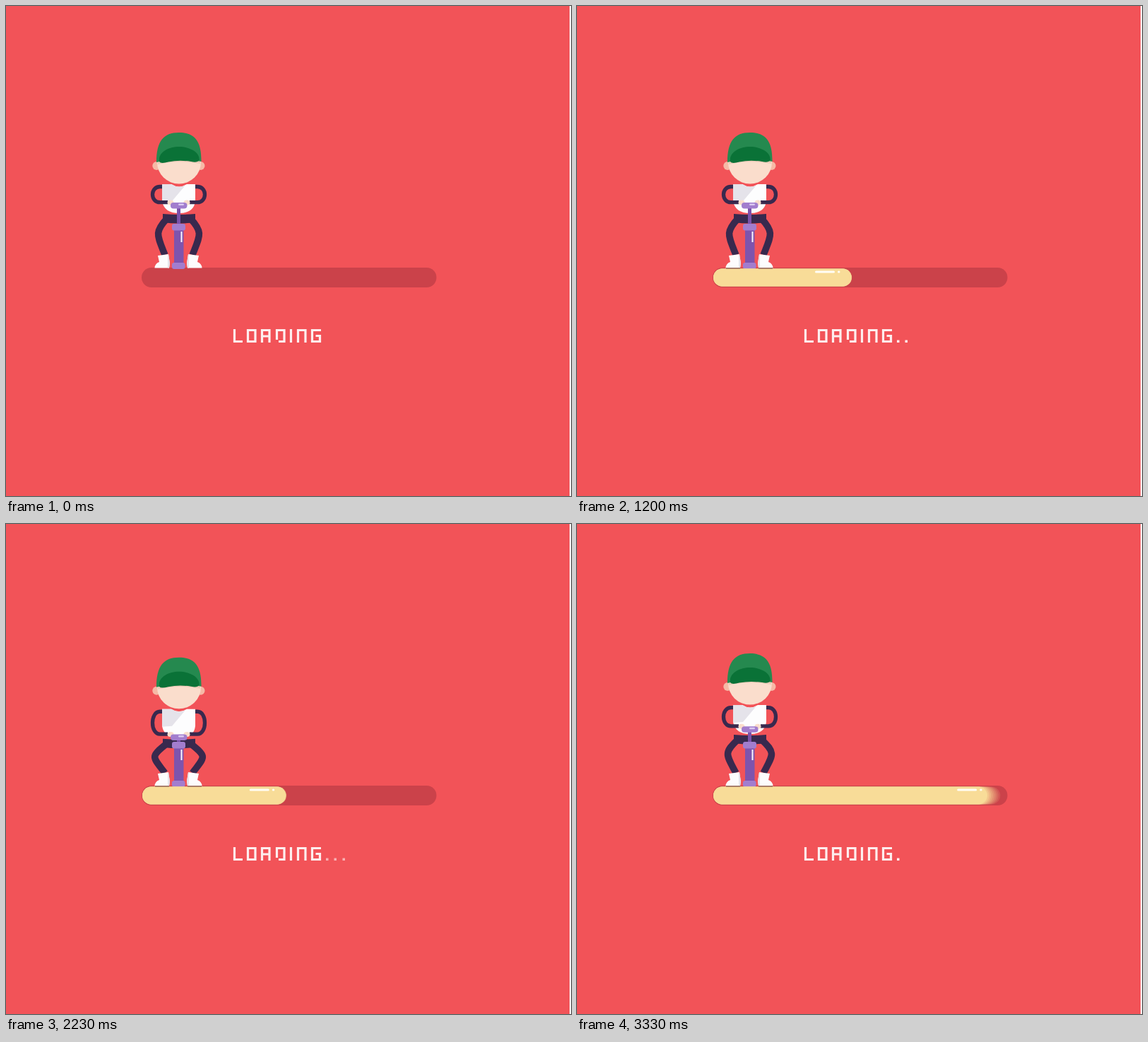
Animation of 800 by 693 pixels, one loop 3360 ms. Source, as an HTML page:

```html
<!DOCTYPE html>
<html lang="en">
<head>
<meta charset="utf-8">
<title>Loading</title>
<style>
  html, body { margin: 0; width: 100%; height: 100%; overflow: hidden; background: #f25358; }
  svg { display: block; width: 800px; height: 693px; }
</style>
</head>
<body>
<svg viewBox="0 0 800 693" role="img" aria-label="LOADING...">
  <defs>
    <g id="shoe">
      <path d="M215 353L230 351L232 364L231 370.5H210.5Q211 364 217 362Z" fill="#fdfcfd"/>
      <path d="M229 351.3L230 351L232 364L231 370.5H229Z" fill="#e6e3ea"/>
    </g>
  </defs>
  <rect width="800" height="693" fill="#fff"/>
  <rect width="798" height="693" fill="#f25358"/>
  <rect x="192" y="370" width="417.500" height="28" rx="14" fill="#cb424a"/>

  <g fill="none" stroke="#38294e" stroke-width="9.500">
    <path id="legL"/>
    <path id="legR"/>
  </g>
  <use href="#shoe"/>
  <use href="#shoe" transform="translate(488 0) scale(-1 1)"/>

  <g id="body">
    <path d="M222 294Q245 296 268 294V306Q245 309 222 306Z" fill="#38294e"/>
    <path d="M221 252H234Q245 259 256 252H268V276Q266 293 245 293Q224 293 221 276Z" fill="#fdfdfe"/>
    <path d="M221 252H234Q244 258.500 254 253.500L235 276L221 277Z" fill="#e5e3ea"/>
    <circle cx="213.300" cy="226" r="6" fill="#f6b9a6"/>
    <circle cx="275.500" cy="226" r="6" fill="#f6b9a6"/>
    <path d="M214 214H276V221A31 30.500 0 0 1 214 221Z" fill="#faddcc"/>
    <path d="M215 217H275V223Q245 217 215 224Z" fill="#eccbb8"/>
    <path d="M213 221C213 191 223 179 245 179S277 191 276.500 220Q245 213 213 221Z" fill="#25894f"/>
    <path d="M217 220C215 207 230 199 245 199S275 207 273.500 218Q271 222 262 220Q245 217.500 230 220.500Q219 223.500 217 220Z" fill="#0a7237"/>
  </g>

  <g fill="none" stroke="#38294e" stroke-width="5.300">
    <path id="armL"/>
    <path id="armR"/>
  </g>

  <rect id="rod" x="242" width="5" fill="#7b51aa"/>
  <g id="grip">
    <ellipse cx="233" cy="278" rx="4.500" ry="3.500" fill="#faddcc"/>
    <ellipse cx="256" cy="278" rx="4.500" ry="3.500" fill="#faddcc"/>
    <rect x="233" y="278" width="23.500" height="8.500" rx="4" fill="#a27dce"/>
    <rect x="244" y="279.500" width="8" height="2.500" rx="1.200" fill="#dac8f0"/>
  </g>
  <rect x="238" y="316" width="13.500" height="48" fill="#7e54ad"/>
  <rect x="235" y="308" width="19" height="9.500" rx="3" fill="#a27dce"/>
  <rect x="247.500" y="319" width="2" height="15" fill="#fbf6ff"/>
  <rect x="235" y="363" width="18.500" height="9" rx="3" fill="#a27dce"/>

  <g id="fill">
    <g id="layers" fill="#f8dc98"></g>
    <path d="M211 371H231M257 371H277" stroke="#93705c" stroke-width="1.500"/>
    <g id="shine" fill="#fffdf5">
      <rect x="-52" y="374.500" width="28" height="3" rx="1.500"/>
      <rect x="-20" y="374.500" width="3.500" height="3" rx="1.500"/>
    </g>
  </g>

  <g fill="none" stroke="#fdeeee" stroke-width="3.200">
    <path d="M323.500 457V474.500H335"/>
    <path d="M342.500 458.500H353V474.500H342.500Z"/>
    <path d="M362.500 476V458.500H373V476M362.500 467H373"/>
    <path d="M383.500 472V458.500H394V474.500H386"/>
    <path d="M403.500 457V476"/>
    <path d="M412 458.500H424V476M413.500 457V476"/>
    <path d="M446 458.500H433.500V474.500H444.500V466.500H438.500"/>
  </g>
  <g id="dots" fill="#fdeeee">
    <rect x="453" y="472.500" width="3.500" height="3.500"/>
    <rect x="464.500" y="472.500" width="3.500" height="3.500"/>
    <rect x="476.500" y="472.500" width="3.500" height="3.500"/>
  </g>
</svg>
<script>
const LOOP = 3360, STEP = 100 / 3, LEFT = 193, LAYERS = 8;
const $ = id => document.getElementById(id);
const set = (el, attrs) => { for (const k in attrs) el.setAttribute(k, attrs[k]); };
const clamp = x => Math.max(0, Math.min(1, x));

const layers = Array.from({ length: LAYERS }, (_, i) => {
  const r = document.createElementNS('http://www.w3.org/2000/svg', 'rect');
  set(r, { x: LEFT, y: 371.5, height: 25, rx: 12.5, opacity: 1 / (LAYERS - i) });
  return $('layers').appendChild(r);
});

// [time, bar end, speed in px per ms]
const keys = [
  [0, 193, 0], [500, 269.5, .2], [1200, 389, 0], [1900, 390, .005],
  [2600, 418, .08], [3000, 467, .165], [3333, 590, .573]
];

function barEnd(t) {
  let i = 0;
  while (i < keys.length - 2 && t > keys[i + 1][0]) i++;
  const [t0, a, va] = keys[i], [t1, b, vb] = keys[i + 1];
  const d = t1 - t0, u = (t - t0) / d, w = 1 - u;
  return a * (1 + 2 * u) * w * w + va * d * u * w * w
       + b * u * u * (3 - 2 * u) - vb * d * u * u * w;
}

// [start, length] of each push on the pump
const pushes = [[90, 320], [690, 320], [1390, 320], [2090, 320], [2640, 300], [3000, 260], [3267, 300]];

function press(t) {
  const p = pushes.find(([s, d]) => t > s && t < s + d);
  return p ? Math.sin(Math.PI * (t - p[0]) / p[1]) ** 2 : 0;
}

// Draws a left limb and its mirror image; path(x) returns the path data.
function limb(name, path) {
  $(name + 'L').setAttribute('d', path(x => x));
  $(name + 'R').setAttribute('d', path(x => 489 - x));
}

function drawFigure(t) {
  const dip = 10 * press(t), hand = 2 * dip;
  const top = 255.5 + dip, low = 277.7 + hand, hip = 301 + dip;
  set($('body'), { transform: `translate(0 ${dip})` });
  set($('grip'), { transform: `translate(0 ${hand})` });
  set($('rod'), { y: 285 + hand, height: Math.max(0, 25 - hand) });
  limb('arm', x => `M${x(221)} ${top}H${x(218)}C${x(204)} ${top} ${x(204)} ${low} ${x(218)} ${low}H${x(229)}`);
  limb('leg', x => `M${x(227.5)} ${hip}C${x(210 - dip * .67)} ${hip + 19} ${x(214 - dip * .67)} ${324 + dip * .5} ${x(225)} 352`);
}

function drawBar(t) {
  const end = barEnd(t);
  const blur = Math.max(0, end - barEnd(Math.max(0, t - STEP)));
  set($('fill'), { visibility: t > 0 ? 'visible' : 'hidden' });
  layers.forEach((r, i) => {
    const shift = blur * (.5 - i / (LAYERS - 1));
    r.setAttribute('width', Math.max(0, end + shift - LEFT));
  });
  set($('shine'), { transform: `translate(${end} 0)`, opacity: clamp((t - 430) / 180) });
}

function drawDots(t) {
  const n = Math.round(t / STEP) % 23;
  const fade = clamp((22.5 - n) / 2.5);
  [[2.5, 3], [8, 3], [14, 3.3]].forEach(([start, len], i) => {
    $('dots').children[i].setAttribute('opacity', clamp((n - start) / len) * fade);
  });
}

function draw(ms) {
  const now = ms % LOOP;
  const t = now < 70 ? 0 : Math.floor((now + 3.5) / STEP) * STEP;
  drawFigure(t);
  drawBar(t);
  drawDots(t);
}

const begin = performance.now();
function tick() {
  draw(performance.now() - begin);
  requestAnimationFrame(tick);
}
tick();
</script>
</body>
</html>
```
